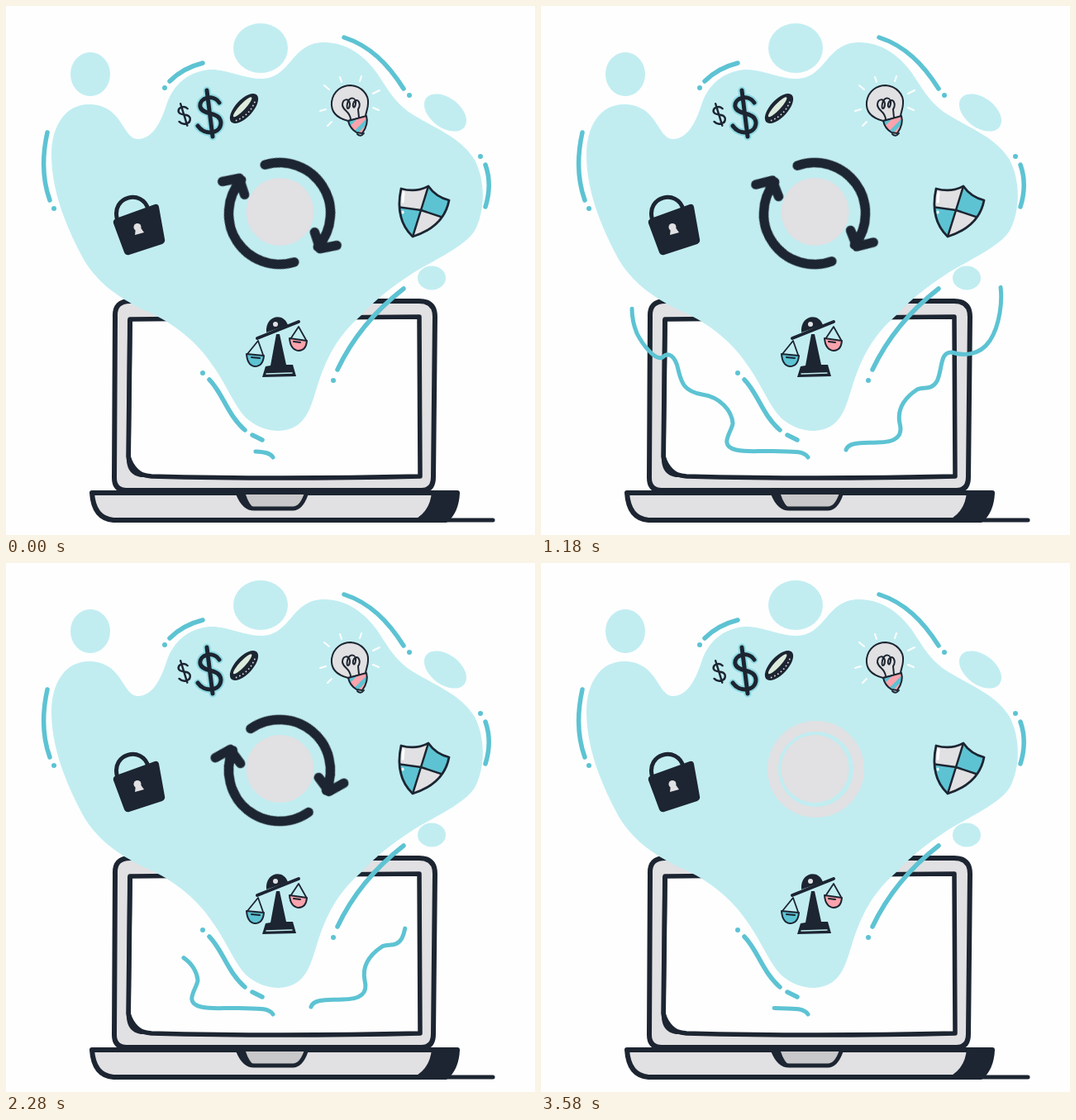
Recreate the animation shown at these times as an HTML page. Size 640 by 640 pixels, loop 3.6 s.

```html
<!DOCTYPE html>
<html lang="en">
<head>
<meta charset="utf-8">
<title>Laptop ideas</title>
<style>
  html, body { margin: 0; width: 100%; height: 100%; overflow: hidden; background: #fefefe; }
  svg { display: block; width: 100vw; height: 100vh; }
  svg * { stroke-linecap: round; stroke-linejoin: round; }
  .line { fill: none; stroke: #1c2531; }
  .ink { fill: #1c2531; }
  .grey { fill: #e1e0e2; }
  .teal { fill: #5dc3d3; }
  .pink { fill: #fba3ac; }
  .blob { fill: #c1edf1; }
  .accent { fill: none; stroke: #5dc3d3; stroke-width: 5.5; }
  .thin { stroke: #1c2531; stroke-width: 2; }

  .spin { animation: spin 3.6s linear infinite, fade 3.6s linear infinite; }
  .ring { fill: none; stroke: #e1e0e2; stroke-width: 13; animation: ring 3.6s linear infinite; }
  .squiggle { fill: none; stroke: #5dc3d3; stroke-width: 5; stroke-dasharray: 400; }
  .left { animation: left 1.8s linear infinite; }
  .right { animation: right 1.8s linear infinite; }

  @keyframes spin { from { transform: rotate(73deg); } to { transform: rotate(613deg); } }
  @keyframes fade { 0%, 86.5% { opacity: 1; } 89.44% { opacity: .72; } 96.5%, 100% { opacity: 0; } }
  @keyframes ring { 0%, 94.5% { opacity: 0; } 99%, 100% { opacity: 1; } }
  @keyframes left {
    0% { stroke-dashoffset: 377; }
    6.67% { stroke-dashoffset: 344; }
    21.1% { stroke-dashoffset: 272; }
    46.7% { stroke-dashoffset: 114; }
    56%, 65.6% { stroke-dashoffset: 63; }
    78.9% { stroke-dashoffset: 262; }
    90% { stroke-dashoffset: 340; }
    98.9% { stroke-dashoffset: 356; }
    100% { stroke-dashoffset: 377; }
  }
  @keyframes right {
    0%, 4% { stroke-dashoffset: 405; }
    6.67% { stroke-dashoffset: 392; }
    21.1% { stroke-dashoffset: 275; }
    46.7%, 63% { stroke-dashoffset: 47; }
    65.6% { stroke-dashoffset: 74; }
    78.9% { stroke-dashoffset: 360; }
    82%, 100% { stroke-dashoffset: 405; }
  }
</style>
</head>
<body>
<svg viewBox="0 0 640 640">
  <defs>
    <g id="arrow" class="line" stroke-width="11.5">
      <path d="M-61.500 0A61.500 61.500 0 0 1 52.200 -32.600"/>
      <path d="M34 -34L55 -34.500L57 -55"/>
    </g>
    <path id="dollar" d="M258 117C251 106 233 111 235 122C238 133 259 127 260 141C260 155 240 157 232 145M243 102L250 158"/>
    <path id="shield" d="M478 221Q496 226 511 218Q520 231 536 235Q530 267 492 279Q470 258 478 221Z"/>
    <clipPath id="shieldClip"><use href="#shield"/></clipPath>
    <path id="cap" d="M414 139L436 133Q439 143 431 154L424 153Q416 148 414 139Z"/>
    <clipPath id="capClip"><use href="#cap"/></clipPath>
  </defs>

  <!-- laptop -->
  <path class="line" stroke-width="6" style="fill:#e1e0e2" d="M132 376Q131 357 150 357L500 357Q519 357 519 376L517 570Q517 586 503 586L146 586Q131 586 131 571Z"/>
  <path class="line" stroke-width="5.500" style="fill:#fefefe" d="M150 379L500 376L501 569Q330 573 176 569Q150 567 148 545Z"/>
  <path class="ink" d="M147 379L153 379L151 545Q156 563 177 570L163 570Q147 567 146 550Z"/>
  <path class="line" stroke-width="6" style="fill:#e1e0e2" d="M104 589L546 589Q545 611 532 622L130 622Q106 620 104 589Z"/>
  <path class="ink" d="M515 588L548 588Q546 612 533 622L493 622Q513 612 515 588Z"/>
  <path class="line" stroke-width="5" d="M500 622L589 622"/>
  <path class="line" stroke-width="5" style="fill:#c8c7c9" d="M281 591Q288 608 300 608L347 608Q357 608 363 591"/>
  <path class="ink" d="M279 589L290 591Q294 604 302 609Q287 610 279 589Z"/>

  <!-- cloud -->
  <g class="blob">
    <path d="M100 119C72 119 55 145 55 180C55 220 70 262 92 303C108 333 135 352 165 367C195 379 228 402 248 432C266 456 276 484 290 498C302 509 316 514 331 514C362 512 368 488 376 462C387 427 400 400 430 374C448 354 468 339 488 326C515 308 556 292 568 270C580 245 580 212 567 186C550 158 515 146 490 130C468 115 460 97 448 80C432 58 410 44 385 44C345 44 345 87 310 88C285 88 270 76 245 77C220 80 202 95 194 120C186 145 175 161 160 161C140 161 142 119 100 119Z"/>
    <ellipse cx="102" cy="82.500" rx="24" ry="26.500"/>
    <ellipse cx="308" cy="51" rx="33" ry="30"/>
    <ellipse cx="531.500" cy="129" rx="29" ry="18" transform="rotate(37 531.500 129)"/>
    <ellipse cx="515" cy="329" rx="17" ry="14.500"/>
  </g>
  <path class="accent" d="M50 153C44 180 44 210 53 235M198 91C208 81 222 73 238 69M409 38C440 48 462 70 481 100M580 192C586 209 585 227 580 243M481 342C445 370 418 404 401 440M246 452C262 468 268 495 289 513M298 519L310 525"/>
  <g class="teal">
    <circle cx="58" cy="245" r="3"/>
    <circle cx="192" cy="99" r="3"/>
    <circle cx="488" cy="108" r="3"/>
    <circle cx="574" cy="182" r="3"/>
    <circle cx="396" cy="453" r="3"/>
    <circle cx="238" cy="444" r="3"/>
  </g>

  <!-- money -->
  <g fill="none">
    <use href="#dollar" stroke="#8ed9e2" stroke-width="9"/>
    <use href="#dollar" stroke="#1c2531" stroke-width="5"/>
    <use href="#dollar" stroke="#1c2531" stroke-width="5" transform="translate(215 131.500) rotate(-10) scale(.49) translate(-246 -130)"/>
  </g>
  <g transform="rotate(-47 288 124)">
    <ellipse class="ink" cx="288" cy="124" rx="22.500" ry="10.500"/>
    <ellipse cx="288" cy="121.500" rx="16" ry="3.600" fill="#dcebdc"/>
    <path d="M271 127Q288 135 305 127" fill="none" stroke="#e1e0e2" stroke-width="1.800" stroke-dasharray=".1 4.500"/>
  </g>

  <!-- bulb -->
  <path d="M404 86L406 92M430 85L428 91M444 106L452 102M385 96L391 101M380 127L387 125M444 123L451 126M389 145L394 140" stroke="#fefefe" stroke-width="2" fill="none"/>
  <path class="thin grey" d="M414 139C398 135 393 126 394 116C396 102 407 96 417 96C430 97 439 107 438 118C438 125 435 129 435 134Z"/>
  <path class="line" stroke-width="2" d="M417 137C416 127 408 127 407 120C407 112 415 111 416 118C416 126 411 126 413 118C416 108 424 111 423 118C422 126 418 122 421 116C426 110 430 119 426 125L427 135"/>
  <use href="#cap" class="pink"/>
  <path clip-path="url(#capClip)" d="M412 146L426 132M422 154L440 136" stroke="#5dc3d3" stroke-width="5"/>
  <use href="#cap" class="line" stroke-width="2"/>
  <path class="line" stroke-width="2" d="M425 155Q429 159 433 154"/>

  <!-- padlock -->
  <path class="line" stroke-width="5" d="M134.500 258C127 230 165 221 172 246"/>
  <path class="ink" d="M133 257L180 240Q184 239 185 243L192 282Q193 286 189 288L149 301Q145 302 143 298L130 263Q129 259 133 257Z"/>
  <circle class="grey" cx="159" cy="267.500" r="4.500"/>
  <path class="grey" d="M157 268L162 267L167 274L156 277Z"/>

  <!-- shield -->
  <use href="#shield" class="grey"/>
  <g clip-path="url(#shieldClip)">
    <path class="teal" d="M511 215L540 230L531 257L502 247ZM470 242L502 247L492 282L470 275Z"/>
    <path class="line" stroke-width="2.500" d="M511 218L502 247L492 279M474 243L502 247L532 257"/>
    <path d="M481 226L480 237M480 249L480 250" stroke="#fefefe" stroke-width="3"/>
  </g>
  <use href="#shield" class="line" stroke-width="2.800"/>

  <!-- scales -->
  <path class="ink" d="M327 397L331 397L339 434L347 434L351 448L310 449L314 436L320 435Z"/>
  <path d="M315 445L346 444" stroke="#c1edf1" stroke-width="1.500"/>
  <path class="ink" d="M315 395C313 374 336 370 341 386Z"/>
  <circle class="grey" cx="326" cy="385" r="3"/>
  <path class="line" stroke-width="4" d="M304 402L354 382"/>
  <path class="line" stroke-width="1.800" d="M292 421L305 405L311 422M344 403L354 388L363 404"/>
  <path class="thin teal" d="M291 421L312 423Q311 436 301 436Q292 435 291 421Z"/>
  <path class="thin pink" d="M343 402L364 405Q363 417 354 417Q344 416 343 402Z"/>
  <path class="line" stroke-width="2" d="M297 425L307 426M348 406L356 407"/>

  <!-- cycle -->
  <circle class="grey" cx="331.500" cy="249" r="41"/>
  <circle class="ring" cx="332.500" cy="249.500" r="52"/>
  <g transform="translate(331 251)">
    <g class="spin">
      <use href="#arrow"/>
      <use href="#arrow" transform="rotate(180)"/>
    </g>
  </g>

  <path class="squiggle left" pathLength="337" d="M323 546C318 538 305 539 281 538.500C262 538 250 540 236 537C214 532 231 515 232 505C231 490 217 473 195 470C172 466 170 455 166 440C163 425 155 417 147 425C138 430 122 408 116 396C112 386 110 377 110 366"/>
  <path class="squiggle right" pathLength="353" d="M369 537C372 527 390 529 407 528C430 528 438 520 434 505C430 485 443 472 455 464C462 460 472 466 479 454C486 440 482 418 497 419C510 423 530 424 543 405C556 385 558 355 556 340C556 330 554 320 549 315"/>
</svg>
</body>
</html>
```
